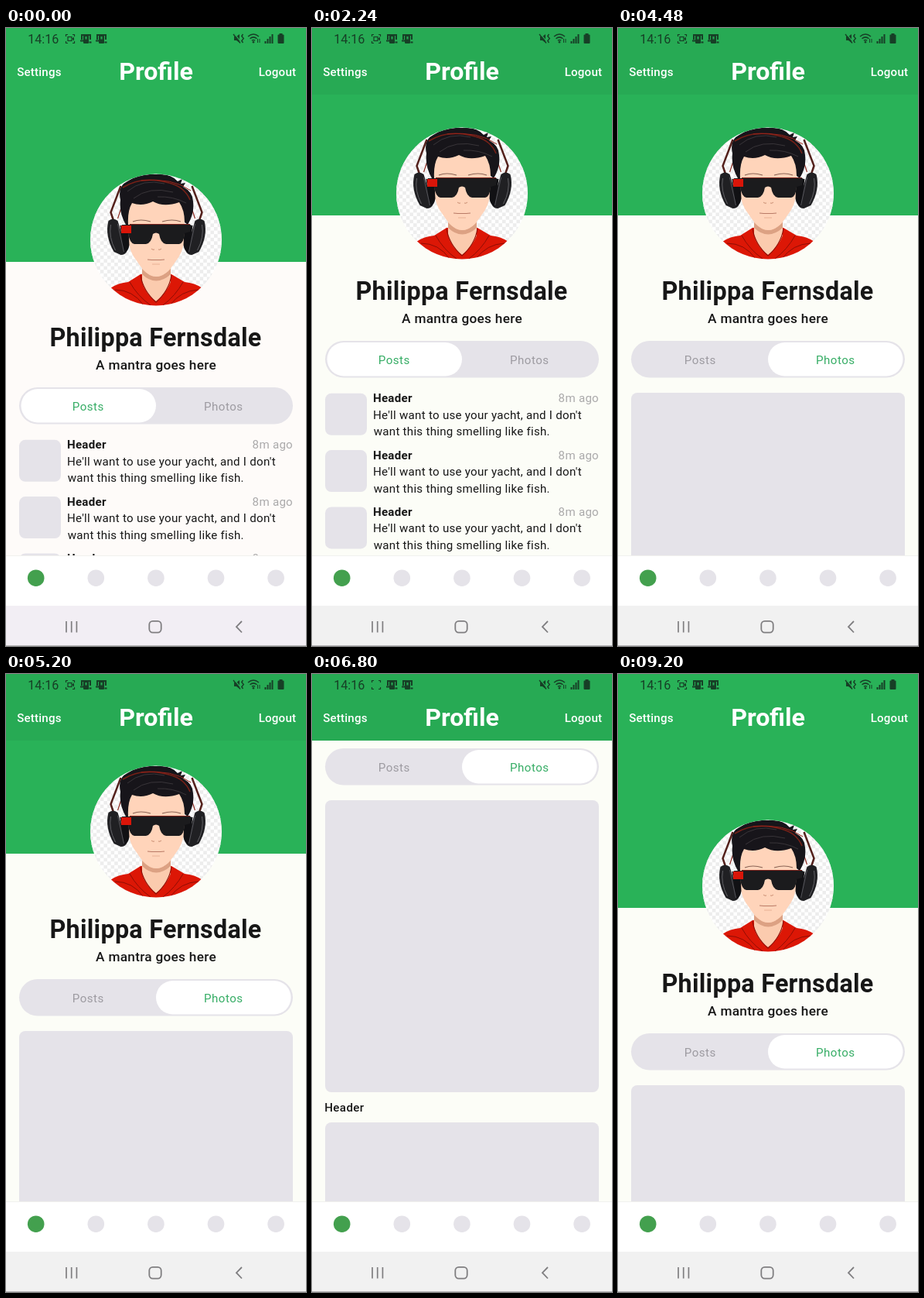
Animation of 388x798 px, one loop 9.28 s. Source, as an HTML page with a canvas:

```html
<!DOCTYPE html>
<html lang="en">
<head>
<meta charset="utf-8">
<title>Profile screen</title>
<style>
  html, body { margin: 0; width: 100%; height: 100%; overflow: hidden; background: #fcfdf7; }
  canvas { display: block; width: 388px; height: 798px; }
</style>
</head>
<body>
<canvas id="stage"></canvas>
<script>
const W = 388, H = 798, LOOP = 9280, STEP = 80;
const GREEN = '#29b258', BAR = '#27aa54', GREY = '#e5e3e9', INK = '#171717', DIM = '#173f26';
const TAB_SWITCH = 4160;
const canvas = document.getElementById('stage');
const ctx = canvas.getContext('2d');
const dpr = window.devicePixelRatio || 1;
canvas.width = W * dpr;
canvas.height = H * dpr;

const linear = p => p;
const easeIn = p => p * p;
const easeOut = p => 1 - (1 - p) ** 2;
const clamp = v => Math.max(0, Math.min(1, v));

// time, scroll offset, easing towards this point
const scrollKeys = [
  [1120, 0, linear], [1440, 23.6, easeIn], [2240, 60, easeOut], [4560, 60, linear],
  [5200, 70, easeIn], [5920, 368, easeOut], [7280, 368, linear],
  [7680, 228, easeIn], [8480, 0, easeOut]
];

function scrollAt(t) {
  let [t0, s0] = [0, 0];
  for (const [t1, s1, ease] of scrollKeys) {
    if (t < t1) return s0 + (s1 - s0) * ease((t - t0) / (t1 - t0));
    [t0, s0] = [t1, s1];
  }
  return s0;
}

function rect(x, y, w, h, color) {
  ctx.fillStyle = color;
  ctx.fillRect(x, y, w, h);
}

function round(x, y, w, h, r, color) {
  ctx.fillStyle = color;
  ctx.beginPath();
  ctx.roundRect(x, y, w, h, r);
  ctx.fill();
}

function disc(x, y, r, color) {
  ctx.fillStyle = color;
  ctx.beginPath();
  ctx.arc(x, y, r, 0, Math.PI * 2);
  ctx.fill();
}

function shape(d, color) {
  ctx.fillStyle = color;
  ctx.fill(new Path2D(d));
}

function line(d, color, width = 1) {
  ctx.strokeStyle = color;
  ctx.lineWidth = width;
  ctx.stroke(new Path2D(d));
}

function text(str, x, y, size, { weight = 400, color = INK, align = 'left', gap = 0.27 } = {}) {
  ctx.font = `${weight} ${size}px Roboto, sans-serif`;
  ctx.letterSpacing = gap + 'px';
  ctx.textAlign = align;
  ctx.fillStyle = color;
  ctx.fillText(str, x, y);
}

function headphone(side) {
  ctx.save();
  ctx.translate(194.5, 0);
  ctx.scale(side, 1);
  line('M-55 250 L-59 238 L-46 204', '#54211c', 2.5);
  line('M-50 246 L-46 234 L-40 209', '#8a2a20', 1.2);
  shape('M-62 249 Q-56 244 -50 249 L-38 288 Q-40 293 -46 293 L-55 289 Q-67 268 -62 249Z', '#202023');
  shape('M-47 255 Q-40 253 -36 262 L-35 280 Q-36 289 -42 290Z', '#111114');
  line('M-59 254 Q-62 270 -53 287', '#606064', 1);
  line('M-50 253 L-42 289', '#55555a', 1);
  ctx.restore();
}

function avatar() {
  ctx.save();
  ctx.beginPath();
  ctx.arc(194, 273.5, 85, 0, Math.PI * 2);
  ctx.clip();
  rect(108, 188, 172, 172, '#ffffff');
  const cell = 4.6;
  for (let row = 0; row < 38; row++)
    for (let col = row % 2; col < 38; col += 2)
      rect(108 + col * cell, 188 + row * cell, cell, cell, '#ededed');

  // hoodie and neck
  shape('M130 362 L135 336 Q145 329 158 328 L174 318 L214 318 L231 328 Q244 329 254 336 L260 362Z', '#dc1706');
  shape('M176 303 L213 303 L213 328 Q207 343 194 353 Q180 343 176 328Z', '#fbcbae');
  shape('M176 311 Q194 331 213 311 L213 318 Q194 335 176 318Z', '#dca183');
  line('M174 319 Q177 339 194 354 Q211 339 214 319', '#8e0d05', 1.2);
  line('M141 338 Q164 338 178 358 M249 338 Q226 339 212 358 M160 328 Q170 346 187 358 M229 328 Q219 346 203 358', '#8e0d05', 1);

  // face
  shape('M157 215 L231 215 L231 272 Q229 290 219 302 Q207 321 194 321 Q181 320 170 302 Q159 289 158 272Z', '#ffd4ba');
  line('M188 285 Q190 287 192 286 M197 286 Q199 287 201 285', '#c98d72', 1);
  line('M183 299 Q194 300 205 299', '#b97b66', 1.1);
  line('M189 305 H199', '#e7b194', 1);
  line('M164 250 Q174 246 187 250 M202 250 Q215 246 226 250', '#8a6455', 1.2);

  headphone(1);
  headphone(-1);

  // hair
  shape('M155 254 Q146 239 148 222 Q144 204 157 198 Q172 187 200 189 Q214 189 222 198 L228 195 L226 201 L232 200 L229 205 Q242 212 242 224 Q244 239 235 254 L231 251 Q231 235 224 225 Q204 232 190 224 Q176 231 163 226 Q157 236 158 254Z', '#17151a');
  line('M157 211 Q177 194 205 201 M165 220 Q185 204 216 212 M196 218 Q216 217 233 226', '#393539', 1);
  line('M151 206 Q176 190 211 200 Q231 205 238 222', '#762017', 1.5);
  line('M175 197 Q216 193 239 210', '#9a241b', 1);

  // glasses
  shape('M150 254 H239 L238 263 L231 265 Q230 278 224 279 H207 Q200 278 198 266 Q194 263 190 266 Q188 278 181 279 H166 Q160 278 158 265 L150 264Z', '#1b1b1d');
  line('M160 253.5 H238', '#7a231c', 1.2);
  rect(149, 255, 13, 10, '#d91509');
  ctx.restore();
}

function tabs(t) {
  const p = easeOut(clamp((t - TAB_SWITCH) / 240));
  const photos = t >= TAB_SWITCH;
  const tone = on => on ? '#36ad65' : '#9d9ba1';
  round(17, 464, 354, 47.5, 23.75, GREY);
  round(19.5 + 174.5 * p, 466, 174.5, 43.5, 21.75, '#ffffff');
  text('Posts', 106.3, 493.7, 15.1, { color: tone(!photos), align: 'center', gap: 0.5 });
  text('Photos', 281.3, 493.7, 15.1, { color: tone(photos), align: 'center', gap: 0.5 });
}

function posts() {
  for (let i = 0; i < 8; i++) {
    const y = 531.8 + i * 73.3;
    round(17, y, 54, 54, 8, GREY);
    text('Header', 79, y + 11.4, 15.1, { weight: 700 });
    text('8m ago', 371, y + 11.4, 15.1, { color: '#aaa9aa', align: 'right' });
    text("He'll want to use your yacht, and I don't", 79, y + 33, 15.1);
    text('want this thing smelling like fish.', 79.7, y + 54.5, 15.1);
  }
}

function photos() {
  for (let i = 0; i < 3; i++) {
    const y = 531 + i * 416;
    round(17, y, 354, 377, 8, GREY);
    text('Header', 16.2, y + 402, 15.1, { weight: 500, gap: 0.4 });
  }
}

function phoneIcon(x) {
  shape(`M${x - 6} 8 H${x + 7} V15 H${x + 5} V10 H${x - 4} V15 H${x - 6}Z`, DIM);
  round(x - 3, 8, 7, 12, 1, DIM);
  rect(x - 0.5, 11, 2, 3.5, BAR);
  rect(x - 7, 15.5, 4, 2, DIM);
  rect(x + 4.5, 17.5, 3, 2, DIM);
}

function statusBar(t) {
  text('14:16', 28.2, 19.8, 16.1, { color: DIM, gap: 0 });
  line('M80 8.5 H77.5 V11 M86 8.5 H88.5 V11 M77.5 17 V19.5 H80 M88.5 17 V19.5 H86', DIM, 1.2);
  if (t % 1000 < 500) {
    ctx.strokeStyle = DIM;
    ctx.strokeRect(80, 11.5, 5, 5);
    shape('M85 14 L88 11.5 V16.5Z', DIM);
  }
  phoneIcon(103);
  phoneIcon(123);

  // muted speaker, wifi, signal, battery
  shape('M295 11 H298 L302 8 V19 L298 16 H295Z', DIM);
  line('M295 7 L304 18', BAR, 1.2);
  line('M294 8 L303 19.5', DIM, 1.3);
  line('M306.5 8 L304.8 10.5 L307.3 13.5 L304.8 16.5 L306.5 19', DIM, 1.4);
  line('M313 11 Q320 5 327 11 M315.5 13.8 Q320 10 324.5 13.8 M318 16.3 Q320 14.6 322 16.3', DIM, 1.5);
  disc(320, 18.3, 1.3, DIM);
  line('M325.5 14 V19 M328 14 V19', DIM, 1);
  for (let i = 0; i < 4; i++) rect(334.5 + i * 3, 17 - i * 3, 2, 3 + i * 3, DIM);
  rect(353.5, 7, 4, 2, DIM);
  round(351.5, 8.5, 8, 11.5, 1, DIM);
}

function header(t, s) {
  ctx.globalAlpha = clamp(s / 20);
  rect(0, 0, W, 86, BAR);
  ctx.globalAlpha = 1;
  statusBar(t);
  const white = '#ffffff';
  text('Profile', 194, 67, 32.2, { weight: 700, color: white, align: 'center', gap: 0 });
  text('Settings', 14.2, 62, 15.1, { weight: 500, color: white, gap: 0.2 });
  text('Logout', 375.2, 62, 15.1, { weight: 500, color: white, align: 'right', gap: 0.2 });
}

function footer(tinted) {
  rect(0, 681, W, 1, '#f1f1ee');
  rect(0, 682, W, 64, '#ffffff');
  for (let i = 0; i < 5; i++) disc(38.7 + i * 77.6, 710.2, 10.8, i ? GREY : '#43a04e');
  rect(0, 746, W, 52, tinted ? '#f2eef4' : '#f1f1f1');
  rect(0, 797, W, 1, '#b5b4b6');
  const grey = '#7f7e80';
  line('M78 766 V780.5 M84.7 766 V780.5 M91.4 766 V780.5', grey, 1.7);
  ctx.strokeStyle = grey;
  ctx.lineWidth = 1.8;
  ctx.beginPath();
  ctx.roundRect(185.3, 765.8, 15.4, 14.8, 4.5);
  ctx.stroke();
  line('M305 766 L298 773.2 L305 780.5', grey, 1.8);
}

function draw(t) {
  const s = scrollAt(t);
  const tinted = t < 1040;
  ctx.setTransform(dpr, 0, 0, dpr, 0, 0);
  rect(0, 0, W, H, tinted ? '#fefbf9' : '#fcfdf7');
  ctx.save();
  ctx.translate(0, -s);
  rect(0, 0, W, 302, GREEN);
  avatar();
  text('Philippa Fernsdale', 193.5, 410.5, 32.3, { weight: 700, align: 'center' });
  text('A mantra goes here', 194, 440.7, 17.25, { weight: 500, align: 'center' });
  tabs(t);
  if (t < TAB_SWITCH) posts(); else photos();
  ctx.restore();
  header(t, s);
  footer(tinted);
}

function frame() {
  const t = performance.now() % LOOP;
  draw(Math.floor(t / STEP) * STEP);
  requestAnimationFrame(frame);
}
frame();
</script>
</body>
</html>
```
